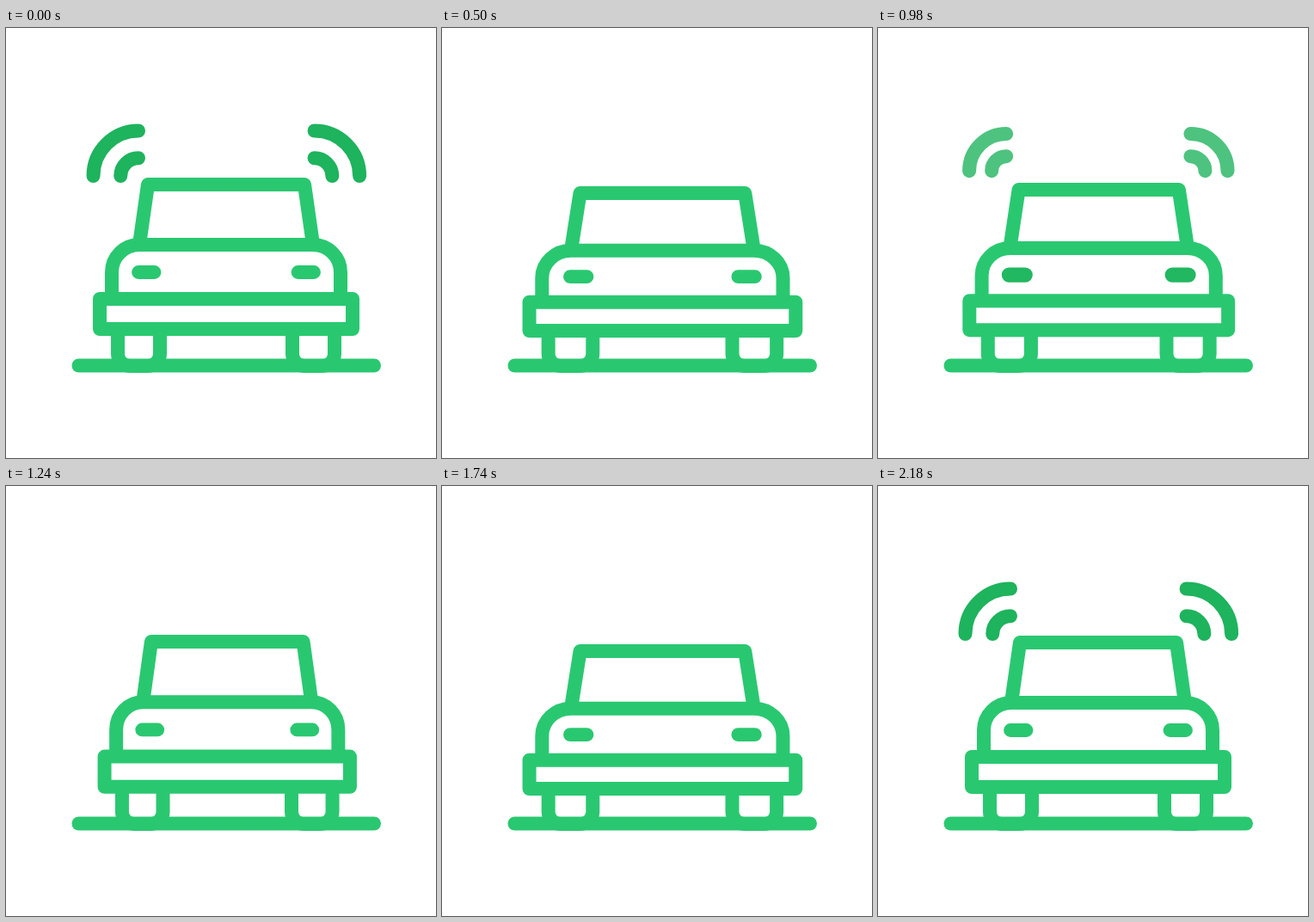
An HTML page for the animation above (2.24 s loop, 500x500 px).

```html
<!DOCTYPE html>
<html lang="en">
<head>
<meta charset="utf-8">
<title>Car alarm</title>
<style>
  html, body { margin: 0; width: 100%; height: 100%; overflow: hidden; background: #fff; }
  svg { display: block; width: 100vw; height: 100vh; }
  path { fill: none; stroke: #29c870; stroke-width: 16; stroke-linecap: round; stroke-linejoin: round; }
  #waves { stroke: #1eb35d; }
</style>
</head>
<body>
<svg viewBox="0 0 500 500">
  <path d="M84.5 392.5H428"/>
  <path id="car"/>
  <path id="lights"/>
  <path id="waves"/>
</svg>
<script>
const LOOP = 2240, STEP = 20, GROUND = 392.5, MIDDLE = 256.3;
const START = 85, END = 2180, BEAT = 405, RISE = 290, BEATS = 4;

// Car centre and scale; wave radius, distance from the middle, and height on the stage.
const rest = { cx: 256, sx: 1, sy: 1, r: 52.5, gap: 102.3, wy: 172 };
const squash = { cx: 256.4, sx: 1.054, sy: 0.952, r: 35, gap: 103, wy: 170.5 };
const stretch = { cx: 258, sx: 0.898, sy: 1.051, r: 76, gap: 123.8, wy: 148.5 };

const el = id => document.getElementById(id);
const car = el("car"), lights = el("lights"), waves = el("waves");
const ramp = (x, a, b) => Math.min(1, Math.max(0, (x - a) / (b - a)));
const easeInOut = u => (1 - Math.cos(Math.PI * u)) / 2;
const easeOut = u => Math.sin(Math.PI * u / 2);
const mix = (a, b, k) => a + (b - a) * k;

function blend(from, to, k) {
  const pose = {};
  for (const key in from) pose[key] = mix(from[key], to[key], k);
  return pose;
}

function render({ cx, sx, sy, r, gap, wy }, alpha, glow) {
  const x = d => cx + d * sx, y = h => GROUND - h * sy;
  const hood = y(140.5), top = y(77.5), bottom = y(42.5);
  const bend = `${32 * sx} 32 0 0 1`;
  const wheel = (a, b) => `M${x(a)} ${bottom}V379a14 14 0 0 0 14 14` +
    `H${x(b) - 14}a14 14 0 0 0 14 -14V${bottom}`;
  car.setAttribute("d",
    `M${x(-101)} ${hood}L${x(-91)} ${y(210.5)}H${x(91)}L${x(101)} ${hood}` +
    `M${x(-133)} ${top}V${hood + 32}A${bend} ${x(-101)} ${hood}` +
    `H${x(101)}A${bend} ${x(133)} ${hood + 32}V${top}` +
    `M${x(-147)} ${top}H${x(147)}V${bottom}H${x(-147)}Z` +
    wheel(-126, -77) + wheel(77, 126));

  lights.setAttribute("d", [-1, 1].map(side =>
    `M${x(side * 102)} ${y(108.5)}H${x(side * 83.5)}`).join(""));
  lights.style.strokeWidth = 15.8 + 1.8 * glow;
  lights.style.stroke =
    `rgb(${mix(41, 30, glow)},${mix(200, 179, glow)},${mix(112, 93, glow)})`;

  const arc = (side, q) => {
    const wx = MIDDLE + side * gap;
    return `M${wx + side * q} ${wy}A${q} ${q} 0 0 ${side < 0 ? 1 : 0} ${wx} ${wy - q}`;
  };
  waves.setAttribute("d", [-1, 1].map(side => arc(side, r) + arc(side, r * 0.395)).join(""));
  waves.style.opacity = alpha;
}

function draw(t) {
  if (t <= START || t >= END) return render(rest, 1, 0);
  const beat = Math.floor((t - START) / BEAT);
  const since = t - START - beat * BEAT;
  const fadeIn = p => ramp(p, 0.04, 0.24);

  if (beat >= BEATS) {
    const p = easeInOut(since / (END - START - BEATS * BEAT));
    render(blend(squash, rest, p), fadeIn(p), 0);
  } else if (since < RISE) {
    const u = since / RISE, first = beat === 0;
    const p = first ? easeOut(u) : easeInOut(u);
    const alpha = (first ? 1 : fadeIn(p)) * (1 - ramp(p, 0.7, 1) ** 2);
    render(blend(first ? rest : squash, stretch, p), alpha, alpha * ramp(u, 0, 0.3));
  } else {
    render(blend(stretch, squash, easeInOut((since - RISE) / (BEAT - RISE))), 0, 0);
  }
}

const start = performance.now();
function tick() {
  const t = (performance.now() - start) % LOOP;
  draw(Math.floor(t / STEP) * STEP);
  requestAnimationFrame(tick);
}
tick();
</script>
</body>
</html>
```
